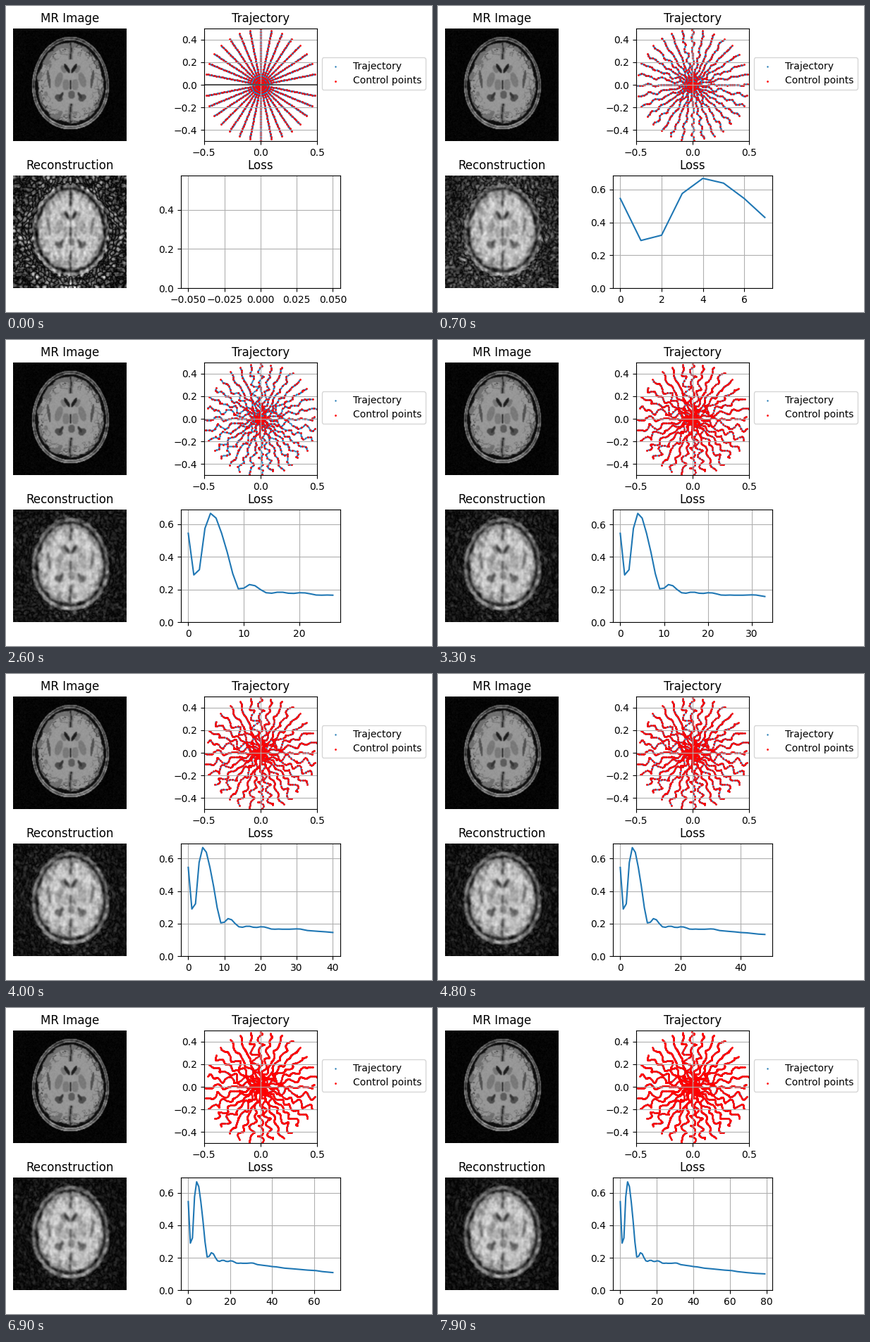
Recreate the animation shown at these times as a matplotlib script. Size 604 by 435 pixels, loop 8000 ms.

```python
import numpy as np
import matplotlib.pyplot as plt
from matplotlib.animation import FuncAnimation

W, H, DPI = 604, 435, 100
FRAMES, N, SPOKES, DENSE = 80, 160, 16, 640
rng = np.random.default_rng(4)

y, x = np.mgrid[:N, :N].astype(float)
f = np.fft.fftfreq(N)
freq = np.hypot(f[:, None], f[None, :])
radius = freq * N


def lowpass(sigma):
    return np.exp(-2 * (np.pi * sigma * freq) ** 2)


def blur(img, sigma):
    return np.fft.ifft2(np.fft.fft2(img) * lowpass(sigma)).real


def noise(sigma):
    n = blur(rng.normal(size=(N, N)), sigma)
    return n / n.std()


def blob(cx, cy, a, b, tilt=0):
    c, s = np.cos(np.radians(tilt)), np.sin(np.radians(tilt))
    dx, dy = x - cx, y - cy
    return np.hypot((c * dx + s * dy) / a, (c * dy - s * dx) / b) < 1


# --- head slice -----------------------------------------------------------
u, v = x - 80.5, y - 77.5
edge = np.hypot(u / (54 + 0.05 * v), v / 65.5)
depth = (1 - edge) * 58


def make_head():
    img = np.full((N, N), 0.02)
    n1, n2, n3 = noise(2.6), noise(2.0), noise(1.5)
    for start, level in ((0, 0.42), (1.6, 0.22), (3, 0.44), (4.6, 0.05)):
        img[depth > start] = level
    ring = (depth > 0) & (depth < 4.6)
    img[ring] += (0.06 * n3 + 0.12 * np.clip(v / 65, 0, 1))[ring]

    d = depth - 7.5 + 0.7 * n1
    brain = d > 0
    img[brain] = 0.59
    mid = (np.abs(v + 2) > 31) & brain
    wave = np.abs(u + 0.7 * np.sin(v / 6))
    grey = (d < 4 + 3 * n1) | ((np.abs(n2) < 0.25) & (d < 15)) | (mid & (wave < 3))
    img[brain & grey] = 0.44
    img[brain & (((np.abs(n1) < 0.11) & (d < 9)) | (d < 0.8))] = 0.17
    img[mid & (wave < 0.9)] = 0.14

    for side in (-1, 1):
        def put(dx, cy, a, b, tilt, level):
            img[blob(80.5 + side * dx, cy, a, b, side * tilt)] = level
        put(16.5, 73, 5, 11, -15, 0.47)
        put(6.5, 80, 5, 8, 0, 0.48)
        put(30.5, 72, 2, 13, 8, 0.32)
        put(10, 58, 3, 6, 25, 0.46)
        put(5, 57, 2.3, 7.5, 32, 0.12)
        put(16.5, 98.5, 6, 4.5, -35, 0.3)
        put(13, 95, 2, 5, -30, 0.2)
    img[blob(80.5, 80, 1.1, 7)] = 0.15
    img[blob(82, 94, 5, 6)] = 0.36
    return np.clip(blur(img, 0.5) + 0.01 * noise(0.5), 0, 1)


head = make_head()
spectrum = np.fft.fft2(head)
base = 1.3 * blur(head, 1.3)

# --- k-space spokes -------------------------------------------------------
angle = np.arange(SPOKES) * np.pi / SPOKES
along = np.stack([np.cos(angle), np.sin(angle)], -1)[:, None]
across = np.stack([-np.sin(angle), np.cos(angle)], -1)[:, None]
cycles = rng.uniform(5, 13, (2, SPOKES, 6, 1))
phase = rng.uniform(0, 2 * np.pi, (2, SPOKES, 6, 1))
s_dense = np.linspace(-0.49, 0.49, DENSE)


def control_points(k):
    """Spokes that bend over time; the point count doubles at each stage."""
    s = np.linspace(-0.49, 0.49, 43 * 2 ** (k // 30))
    turn = phase + 1.2 * np.exp(-k / 12) + 0.003 * k
    bend, slip = np.sin(2 * np.pi * cycles * s + turn).sum(2)
    grow = 1 - np.exp(-k / 10)
    r = s + 0.004 * grow * slip
    pts = r[..., None] * along + 0.0075 * grow * bend[..., None] * across
    return s, np.clip(pts, -0.497, 0.497)


def interpolate(s, pts):
    return np.array([[np.interp(s_dense, s, c) for c in p.T] for p in pts]).transpose(0, 2, 1)


def reconstruct(line, loss):
    """Sample the spectrum along the line and add the aliasing to the blurred head."""
    col, row = np.round(line * N).astype(int).reshape(-1, 2).T % N
    hits = np.zeros((N, N))
    np.add.at(hits, (row, col), 1)
    weight = np.where(radius < 5, 1, hits * radius / 20.8)
    alias = np.fft.ifft2(spectrum * (weight - 1) * lowpass(1.0))
    alias /= np.sqrt(np.mean(np.abs(alias[edge > 1.05]) ** 2))
    t = np.clip((edge - 0.9) / 0.15, 0, 1)
    inner, outer = 0.06 + 0.06 * loss, 0.03 + 0.4 * loss
    return np.abs(base + alias * (inner + (outer - inner) * t))


# --- loss curve -----------------------------------------------------------
early = [.545, .29, .322, .575, .667, .638, .545, .43, .298, .205, .209, .231, .224,
         .2, .181, .178, .184, .184, .178, .177, .181, .18, .174, .167, .166, .167, .166]
late = {28: .166, 30: .168, 31: .167, 33: .158, 36: .153, 38: .15, 40: .146, 42: .144,
        46: .136, 50: .132, 57: .124, 61: .121, 64: .115, 69: .109, 74: .104, 79: .101}
losses = np.interp(np.arange(FRAMES), [*range(len(early)), *late], [*early, *late.values()])

# --- figure ---------------------------------------------------------------
# The small excess keeps the pixel size from being rounded down.
fig = plt.figure(figsize=((W + 0.01) / DPI, (H + 0.01) / DPI), dpi=DPI, facecolor="white")
SIDE, LOW, HIGH = 160.7, 33.7, 242.57


def panel(left, bottom, title, width=SIDE):
    ax = fig.add_axes([left / W, bottom / H, width / W, SIDE / H])
    ax.set_title(title)
    return ax


def picture(bottom, title, data):
    ax = panel(10, bottom, title)
    ax.axis("off")
    return ax.imshow(data, cmap="gray", vmin=0, vmax=1, aspect="auto")


picture(HIGH, "MR Image", head)
recon = picture(LOW, "Reconstruction", base)

traj_ax = panel(280.54, HIGH, "Trajectory")
line_dots = traj_ax.scatter([], [], s=0.5, label="Trajectory")
ctrl_dots = traj_ax.scatter([], [], s=1, color="r", label="Control points")
axis_line = traj_ax.axhline(0, color="#555555", lw=1.5)
traj_ax.set(xlim=(-0.5, 0.5), ylim=(-0.5, 0.5))
traj_ax.grid(True)
traj_ax.legend(loc="right", bbox_to_anchor=(2, 0.6))

loss_ax = panel(248.17, LOW, "Loss", 225.45)


def update(k):
    s, ctrl = control_points(k)
    line = interpolate(s, ctrl)
    first = 1 if k == 0 else 0
    line_dots.set_offsets(line[first:, ::4].reshape(-1, 2))
    ctrl_dots.set_offsets(ctrl[first:].reshape(-1, 2))
    axis_line.set_visible(k == 0)
    recon.set_data(reconstruct(line, losses[k]))

    loss_ax.cla()
    loss_ax.plot(losses[:k + 1])
    loss_ax.grid(True)
    loss_ax.set_title("Loss")
    loss_ax.set_ylim(bottom=0)
    return line_dots, ctrl_dots, recon


anim = FuncAnimation(fig, update, frames=FRAMES, interval=100, repeat=True, repeat_delay=0)
plt.show()
```
